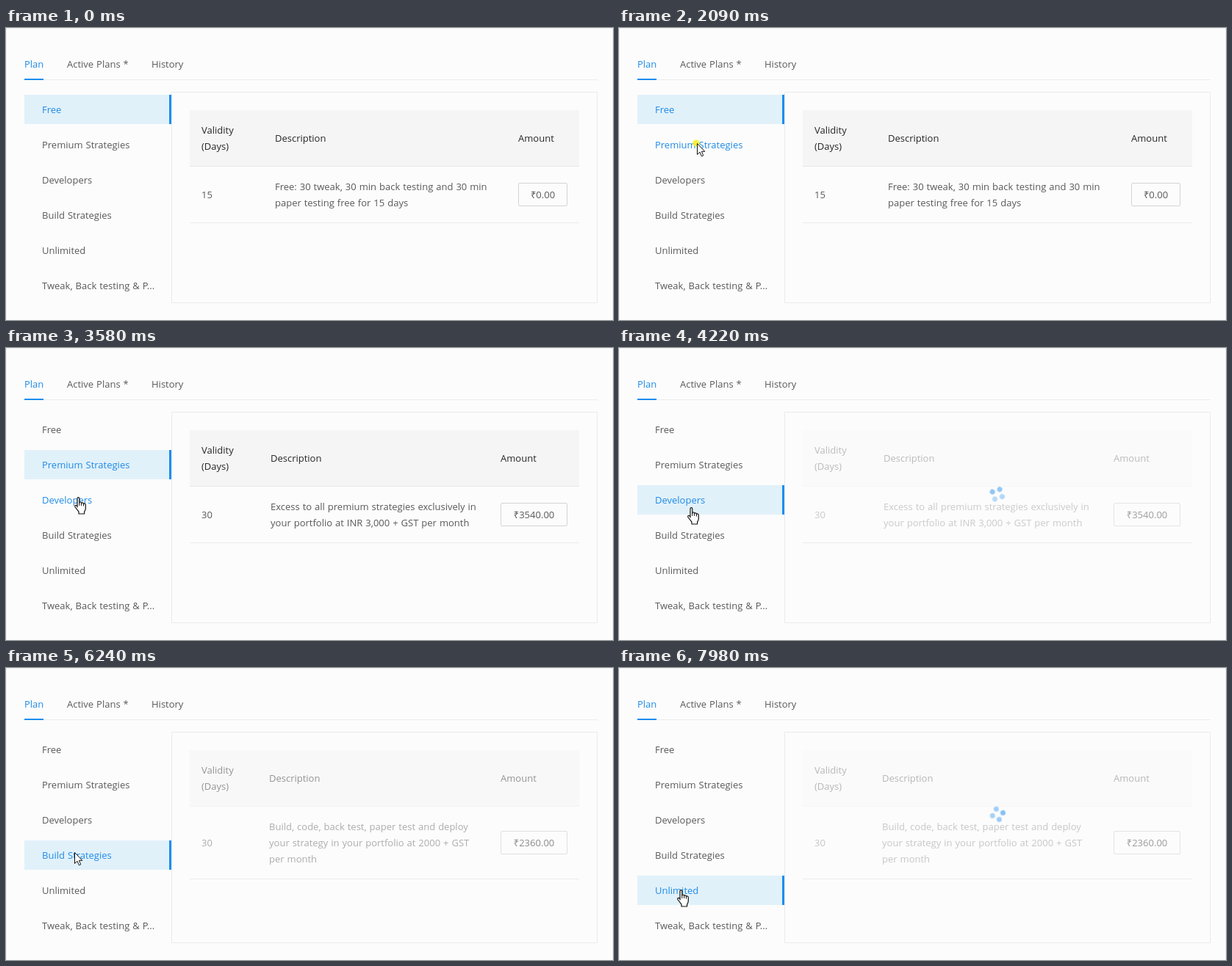
An HTML page for the animation above (8000 ms loop, 826 px wide and 398 px high).

```html
<!DOCTYPE html>
<html lang="en">
<head>
<meta charset="utf-8">
<title>Plans</title>
<style>
@property --on { syntax: "<number>"; inherits: true; initial-value: 0; }
@property --hot { syntax: "<number>"; inherits: true; initial-value: 0; }
@property --dim { syntax: "<number>"; inherits: true; initial-value: 1; }

* { box-sizing: border-box; margin: 0; padding: 0; }
html, body { width: 100%; height: 100%; overflow: hidden; }
html { background: #fcfcfc; }
body {
  position: relative;
  font: 13px/22px "Open Sans", "Noto Sans", sans-serif;
  word-spacing: .6px;
  color: #595959;
  white-space: nowrap;
}
.frame { position: absolute; inset: 0; border: solid #f0f0f0; border-width: 1px 1px 0; }

/* tabs */
.tabs { position: absolute; left: 25px; top: 38px; width: 780px; height: 33px; border-bottom: 1px solid #ebebeb; }
.tabs span { position: absolute; top: 0; }
.tabs .now { left: 0; color: #1e8ae6; }
.tabs::after { content: ""; position: absolute; left: 0; top: 31px; width: 26px; height: 2px; background: #1c8df0; }

/* side menu */
.menu { position: absolute; left: 25px; top: 91px; width: 200px; list-style: none; }
.menu li {
  position: relative; isolation: isolate;
  height: 40px; margin-bottom: 8px; padding-left: 24px; line-height: 40px;
  color: color-mix(in srgb, #1e8ae6 calc(var(--hot) * 100%), #595959);
  animation: 8s ease infinite;
}
.menu li::before, .menu li::after { content: ""; position: absolute; top: 0; bottom: 0; right: 0; }
.menu li::before { left: 0; background: #e1f1fa; opacity: var(--on); z-index: -1; }
.menu li::after {
  width: 3px; background: #1c8df0;
  opacity: calc(var(--on) * 1.2); transform: scaleY(min(1, calc(var(--on) * 1.2)));
}
.menu li:nth-child(1) { animation-name: free; }
.menu li:nth-child(2) { animation-name: premium; }
.menu li:nth-child(3) { animation-name: dev; }
.menu li:nth-child(4) { animation-name: build; }
.menu li:nth-child(5) { animation-name: unlimited; }

@keyframes free {
  0%, 26.4% { --on: 1; --hot: 1; }
  30.1%, 100% { --on: 0; --hot: 0; }
}
@keyframes premium {
  0%, 15% { --on: 0; --hot: 0; }
  18.6% { --hot: 1; }
  26.4% { --on: 0; }
  30.1%, 48.75% { --on: 1; --hot: 1; }
  52.5%, 100% { --on: 0; --hot: 0; }
}
@keyframes dev {
  0%, 41.25% { --hot: 0; }
  44.6% { --hot: 1; }
  0%, 48.75% { --on: 0; }
  52.5%, 74.5% { --on: 1; --hot: 1; }
  78.5%, 100% { --on: 0; --hot: 0; }
}
@keyframes build {
  0%, 66% { --hot: 0; }
  69.75% { --hot: 1; }
  0%, 74.25% { --on: 0; }
  78%, 97.6% { --on: 1; --hot: 1; }
  100% { --on: 0; --hot: 0; }
}
@keyframes unlimited {
  0%, 89% { --hot: 0; }
  92.5%, 100% { --hot: 1; }
  0%, 97.6% { --on: 0; }
  100% { --on: 1; }
}

/* plan table */
.box { position: absolute; left: 225px; top: 87px; width: 580px; height: 288px; border: 1px solid #ebebeb; }
.plan { position: absolute; left: 250px; top: 112px; width: 530px; animation: 8s ease infinite; }
.row {
  display: grid; grid-template-columns: var(--d) 1fr var(--m); align-items: center;
  padding: 16px; border-bottom: 1px solid #ebebeb;
}
.head { color: #262626; border-color: #e8e8e8; background: #f5f5f5; }
.head, .row > span { opacity: var(--dim); }
.head > span { opacity: 1; }
.row b {
  height: 32px; border: 1px solid #d4d4d4; border-radius: 2px;
  font-weight: 400; line-height: 30px; text-align: center;
  opacity: calc(.4 + .6 * var(--dim));
}
#p1 { --d: 100px; --m: 67px; animation-name: p1; }
#p2 { --d: 94px; --m: 91px; animation-name: p2; }
#p3 { --d: 109px; --m: 91px; animation-name: p3; }
#p4 { --d: 92px; --m: 91px; animation-name: p4; }

@keyframes p1 {
  0%, 26.4% { --dim: 1; opacity: 1; }
  28.62% { --dim: .35; opacity: 1; }
  28.63%, 100% { --dim: .35; opacity: 0; }
}
@keyframes p2 {
  0%, 28.62% { --dim: .35; opacity: 0; }
  28.63% { --dim: .35; opacity: 1; }
  32%, 48.75% { --dim: 1; opacity: 1; }
  52%, 54.87% { --dim: .3; opacity: 1; }
  54.88%, 100% { --dim: .3; opacity: 0; }
}
@keyframes p3 {
  0%, 54.87% { --dim: .3; opacity: 0; }
  54.88% { --dim: .3; opacity: 1; }
  58.4%, 74.25% { --dim: 1; opacity: 1; }
  77.37% { --dim: .33; opacity: 1; }
  77.38%, 100% { --dim: .33; opacity: 0; }
}
@keyframes p4 {
  0%, 77.37% { --dim: .33; opacity: 0; }
  77.38% { --dim: .33; opacity: 1; }
  81.1%, 97.6% { --dim: 1; opacity: 1; }
  99.8%, 100% { --dim: .32; opacity: 1; }
}

/* spinner */
.spin { position: absolute; left: 505px; top: 190px; width: 20px; height: 20px; animation: turn 8s linear infinite, load 8s linear infinite; }
.spin i { position: absolute; left: 6.5px; top: 6.5px; width: 7px; height: 7px; border-radius: 50%; background: #1c8df0; animation: pulse 1s linear infinite alternate; }
.spin i:nth-child(1) { transform: translate(7.4px, 0); animation-delay: -.6s; }
.spin i:nth-child(2) { transform: translate(0, 7.4px); animation-delay: -1s; }
.spin i:nth-child(3) { transform: translate(-7.4px, 0); animation-delay: -1.4s; }
.spin i:nth-child(4) { transform: translate(0, -7.4px); animation-delay: -1.5s; }
@keyframes turn { from { rotate: 20deg; } to { rotate: 2420deg; } }
@keyframes pulse { from { opacity: .4; } to { opacity: 1; } }
@keyframes load {
  0%, 26.6% { opacity: 0; }
  28.6% { opacity: .55; }
  29.2%, 49% { opacity: 0; }
  51%, 54.8% { opacity: .55; }
  55.8%, 74.5% { opacity: 0; }
  77% { opacity: .55; }
  77.8%, 97.75% { opacity: 0; }
  99.6%, 100% { opacity: .55; }
}

/* pointer */
.dot { position: absolute; left: -6px; top: -5px; width: 10px; height: 10px; border-radius: 50%; background: #f7f01e; animation: click 8s linear infinite; }
@keyframes click {
  0%, 26.1% { opacity: 0; scale: .9; }
  26.11% { opacity: .9; scale: .9; }
  27.8% { opacity: 0; scale: 2; }
  27.9%, 48.3% { opacity: 0; scale: .9; }
  48.4% { opacity: .9; scale: .9; }
  50% { opacity: 0; scale: 2; }
  50.1%, 72% { opacity: 0; scale: .9; }
  72.1% { opacity: .9; scale: .9; }
  73.8% { opacity: 0; scale: 2; }
  73.9%, 97.5% { opacity: 0; scale: .9; }
  97.6% { opacity: .9; scale: .9; }
  99.4%, 100% { opacity: 0; scale: 2; }
}
.mouse { position: absolute; left: 0; top: 0; animation: move 8s ease-in-out infinite; }
.mouse svg { position: absolute; overflow: visible; fill: #fff; stroke: #111; stroke-linejoin: round; }
.arrow { left: 0; top: 0; animation: arrow 8s step-end infinite; }
.hand { left: -5px; top: 0; animation: hand 8s step-end infinite; }
@keyframes move {
  0%, 7.7% { transform: translate(250px, 402px); }
  17.5%, 38.6% { transform: translate(106px, 157px); }
  44.75% { transform: translate(98px, 203px); }
  46.1%, 62.1% { transform: translate(98px, 217px); }
  71.5%, 87.3% { transform: translate(93px, 251px); }
  92.6%, 100% { transform: translate(84px, 302px); }
}
@keyframes arrow { 0% { opacity: 1; } 40% { opacity: 0; } 69% { opacity: 1; } 88.5%, 100% { opacity: 0; } }
@keyframes hand { 0% { opacity: 0; } 40% { opacity: 1; } 69% { opacity: 0; } 88.5%, 100% { opacity: 1; } }
</style>
</head>
<body>
<div class="frame"></div>
<div class="tabs">
  <span class="now">Plan</span>
  <span style="left:58px">Active Plans *</span>
  <span style="left:173px">History</span>
</div>
<div class="box"></div>
<ul class="menu">
  <li>Free</li>
  <li>Premium Strategies</li>
  <li>Developers</li>
  <li>Build Strategies</li>
  <li>Unlimited</li>
  <li>Tweak, Back testing &amp; P...</li>
</ul>

<div class="plan" id="p1">
  <div class="row head"><span>Validity<br>(Days)</span><span>Description</span><span>Amount</span></div>
  <div class="row"><span>15</span><span>Free: 30 tweak, 30 min back testing and 30 min<br>paper testing free for 15 days</span><b>₹0.00</b></div>
</div>
<div class="plan" id="p2">
  <div class="row head"><span>Validity<br>(Days)</span><span>Description</span><span>Amount</span></div>
  <div class="row"><span>30</span><span>Excess to all premium strategies exclusively in<br>your portfolio at INR 3,000 + GST per month</span><b>₹3540.00</b></div>
</div>
<div class="plan" id="p3">
  <div class="row head"><span>Validity<br>(Days)</span><span>Description</span><span>Amount</span></div>
  <div class="row"><span>30</span><span>Developer API at INR 3,500 per month.<br>T&amp;C Applied</span><b>₹4130.00</b></div>
</div>
<div class="plan" id="p4">
  <div class="row head"><span>Validity<br>(Days)</span><span>Description</span><span>Amount</span></div>
  <div class="row"><span>30</span><span>Build, code, back test, paper test and deploy<br>your strategy in your portfolio at 2000 + GST<br>per month</span><b>₹2360.00</b></div>
</div>

<div class="spin"><i></i><i></i><i></i><i></i></div>

<div class="mouse">
  <div class="dot"></div>
  <svg class="arrow" width="12" height="19"><path d="M.5 .5V15.5L4 12.2 6.4 17.8 8.8 16.8 6.4 11.3H10.8Z"/></svg>
  <svg class="hand" width="17" height="24"><path stroke-width="1.2" d="M4 14V2.2Q4 .6 5.4 .6T6.8 2.2V8.2Q7 6.9 8.3 7T9.7 8.6Q10 7.6 11.2 7.8T12.5 9.5Q13 8.7 14.1 9T15.3 10.8V15.5Q15.3 18 13.6 20V23H6V20.2L1.2 14Q.2 12.3 1.4 11.6T4 13Z"/><path fill="none" d="M6.8 8V12M9.7 8.6V12M12.5 9.5V12.5"/></svg>
</div>
</body>
</html>
```
